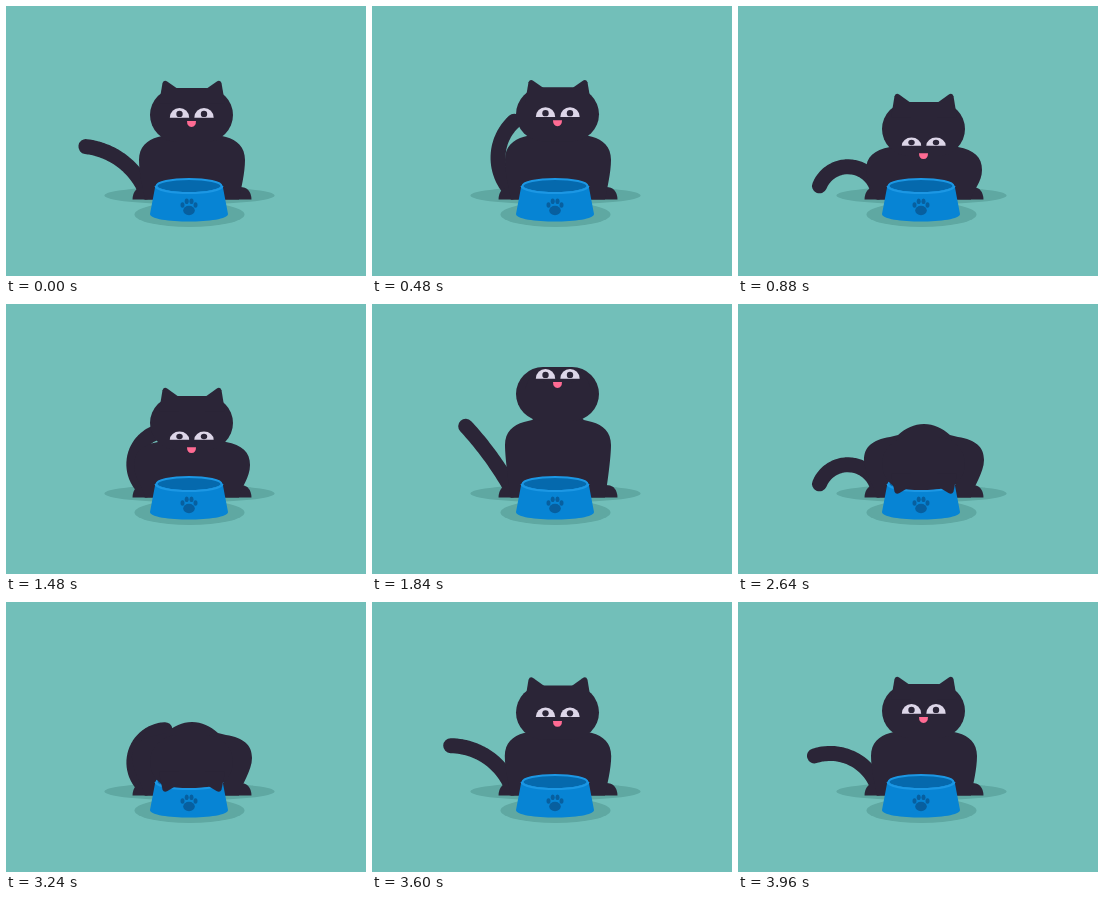
These frames come from a looping animation (360 by 270 pixels, 4 s). An HTML page:

```html
<!DOCTYPE html>
<html lang="en">
<head>
<meta charset="utf-8">
<title>Hungry cat</title>
<style>
  html, body { margin: 0; width: 100%; height: 100%; overflow: hidden; background: #72bfb9; }
  svg { display: block; width: 100vw; height: 100vh; }
  .fur { fill: #2b2537; }
  .shade { fill: #5fa8a2; }
  .paw { fill: #075f9f; }
  .eye { fill: #ddd6e8; }
  .rim { stroke: #1c97e4; stroke-width: 2; }
  #tail { fill: none; stroke: #2b2537; stroke-width: 15; stroke-linecap: round; stroke-linejoin: round; }
</style>
</head>
<body>
<svg viewBox="0 0 360 270">
  <defs>
    <clipPath id="faceClip"><rect x="144" y="-27" width="83" height="62" rx="27"/></clipPath>
    <path id="ear" d="M153 8 L156.5 -14 Q158 -18 161.5 -15.5 L173 -7 V8Z"/>
    <g id="eye">
      <path class="eye" d="M-9.7 0 A9.7 9.7 0 0 1 9.7 0Z"/>
      <circle class="fur" cy="-3.8" r="3.2"/>
    </g>
    <ellipse id="toe" rx="2" ry="2.8"/>
  </defs>

  <ellipse class="shade" cx="183.5" cy="189.5" rx="85" ry="9"/>
  <ellipse class="shade" cx="183.5" cy="208.5" rx="55" ry="12.5"/>

  <path id="tail"/>
  <path class="fur" d="M126.5 193.5 Q127 181 138 181 H234 Q245 181 245.5 193.5Z"/>
  <path id="body" class="fur"/>

  <ellipse class="rim" cx="183" cy="180" rx="32.5" ry="7" fill="#0569ad"/>

  <g id="head">
    <rect class="fur" x="144" y="-27" width="83" height="54" rx="27"/>
    <g clip-path="url(#faceClip)">
      <g id="eyes">
        <use href="#eye" x="173.5"/>
        <use href="#eye" x="198"/>
      </g>
      <path id="mouth" d="M181 0 H190 Q190 5.8 185.5 5.8 Q181 5.8 181 0Z" fill="#ff6b93"/>
    </g>
  </g>

  <path d="M149.500 179 A33.500 7.500 0 0 0 216.500 179 L222 208 C222 218 144 218 144 208Z" fill="#0784d4"/>
  <path class="rim" d="M149.500 180 A33.500 7 0 0 0 216.500 180" fill="none"/>
  <g class="paw">
    <ellipse cx="183" cy="204.500" rx="5.800" ry="4.700"/>
    <use href="#toe" x="176.500" y="199"/>
    <use href="#toe" x="180.700" y="195.200"/>
    <use href="#toe" x="185.500" y="195.200"/>
    <use href="#toe" x="189.500" y="199"/>
  </g>

  <g id="ears" class="fur">
    <use href="#ear"/>
    <use href="#ear" transform="translate(372) scale(-1 1)"/>
  </g>
</svg>
<script>
const LOOP = 4000;
const $ = id => document.getElementById(id);
const rad = deg => deg * Math.PI / 180;
const place = (id, y, scale = 1) =>
  $(id).setAttribute('transform', `translate(0 ${y}) scale(1 ${scale})`);

// head y, head tilt in degrees (positive looks down), body half width, shoulder y
const sit = [109, 0, 53, 137];
const perk = [106, 0, 53, 136];
const crouch = [123, 35, 58, 147];
const peek = [119, 35, 58, 144];
const look = [90, -45, 53, 124];
const rear = [84, -20, 53, 121];
const eat = [160, 165, 60, 139];

const acts = [
  [0, sit], [280, perk], [580, sit], [840, crouch], [1100, crouch], [1480, peek], [1680, peek],
  [1840, look], [2000, rear], [2320, eat], [3280, eat], [3640, sit]
];

// Turning points of the tail: -1 curls down, 1 curls up.
const swings = [
  [340, [1]], [880, [-1]], [1440, [1]], [2000, [-.3]], [2640, [-1]], [3240, [1]], [3800, [-1]]
];

// Cosine easing from key to key, around the loop.
function ease(keys, t) {
  const next = keys.find(k => k[0] > t) || keys[0];
  const prev = keys[(keys.indexOf(next) + keys.length - 1) % keys.length];
  const wrap = d => (d + LOOP) % LOOP;
  const u = wrap(t - prev[0]) / wrap(next[0] - prev[0]);
  const w = (1 - Math.cos(Math.PI * u)) / 2;
  return prev[1].map((a, i) => a + (next[1][i] - a) * w);
}

// An arc of fixed length whose bend follows its direction.
function tailPath(swing) {
  const parts = 28, step = 79 / parts;
  const dir = 57 + 51 * swing, bend = 82.4 - 1.4 * dir;
  let x = 140, y = 186, d = `M${x} ${y}`;
  for (let i = 0; i < parts; i++) {
    const a = rad(dir + bend * (1 - (2 * i + 1) / parts));
    x -= step * Math.cos(a);
    y -= step * Math.sin(a);
    d += `L${x.toFixed(2)} ${y.toFixed(2)}`;
  }
  return d;
}

function bodyPath(half, y) {
  const l = 186 - half, r = 186 + half;
  return `M139 193.5 C137 183 ${l} ${y + 30} ${l} ${y + 17}
    C${l} ${y + 4} ${l + 8} ${y - 3} 152 ${y - 6} L160 ${y - 8}
    C168 ${y - 15} 176 ${y - 19} 186 ${y - 19} S204 ${y - 15} 212 ${y - 8}
    L220 ${y - 6} C${r - 8} ${y - 3} ${r} ${y + 4} ${r} ${y + 17}
    C${r} ${y + 30} 235 183 233 193.5Z`;
}

function draw() {
  const t = performance.now() % LOOP;
  const [head, tilt, half, shoulder] = ease(acts, t);
  const down = Math.max(0, tilt), face = 2.7 + .4 * tilt;
  const earTurn = Math.cos(rad(tilt - 20));
  place('head', head);
  place('eyes', face, 1 - down / 220);
  place('mouth', face + 3.4 + .12 * down);
  place('ears', head - 20 * earTurn, earTurn);
  $('body').setAttribute('d', bodyPath(half, shoulder));
  $('tail').setAttribute('d', tailPath(ease(swings, t)[0]));
  requestAnimationFrame(draw);
}
draw();
</script>
</body>
</html>
```
